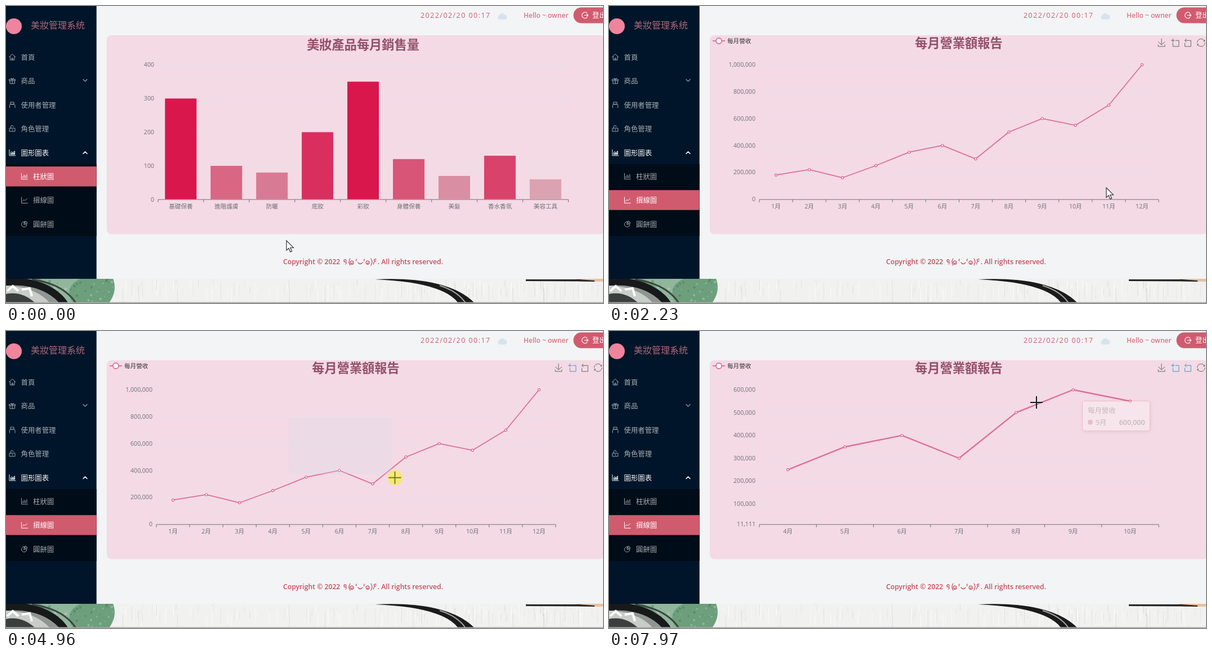
An HTML page that plays this animation: 1060x528 px, repeating every 8 s.

```html
<!DOCTYPE html>
<html lang="zh-Hant">
<head>
<meta charset="utf-8">
<style>
html, body { margin: 0; width: 100%; height: 100%; overflow: hidden; background: #f2f4f5; }
svg { display: block; width: 1060px; height: 528px; }
text { font: 12.4px 'Open Sans', 'Noto Sans CJK TC', 'Noto Sans CJK', sans-serif; white-space: pre; }
.axis text { font-size: 10.6px; fill: #6e7079; }
.title { font-size: 22.2px; font-weight: 700; fill: #925068; text-anchor: middle; }
.bold { font-weight: 600; }
.end { text-anchor: end; }
.mid { text-anchor: middle; }
.stroke { fill: none; stroke-linecap: round; stroke-linejoin: round; }
.tool path { fill: none; vector-effect: non-scaling-stroke; stroke-width: 1; }
</style>
</head>
<body>
<svg viewBox="0 0 1060 528">
  <defs>
    <clipPath id="strip"><rect y="485" width="1060" height="43"/></clipPath>
    <clipPath id="reveal"><rect id="revealBox" x="266" y="96" width="0" height="250"/></clipPath>
    <filter id="shadow" x="-20%" y="-30%" width="140%" height="170%">
      <feDropShadow dx="1" dy="2" stdDeviation="3" flood-opacity=".2"/>
    </filter>
  </defs>
  <rect width="1060" height="528" fill="#f2f4f5"/>

  <g clip-path="url(#strip)">
    <rect y="485" width="1060" height="43" fill="#f1f1f0"/>
    <g id="streaks"></g>
    <ellipse cx="98" cy="500" rx="95" ry="62" fill="#6d9f7d"/>
    <path d="M60 485h72q-30 14-14 43h-18q-6-28-40-43z" fill="#a9c6b0" opacity=".6"/>
    <g id="speckles"></g>
    <ellipse cx="14" cy="556" rx="98" ry="66" fill="#8f9691" stroke="#17191a" stroke-width="13"/>
    <path d="M0 497q52 2 78 31H0z" fill="#c9cdc9"/>
    <path d="M0 512q28-6 52 16H0z" fill="#3a3f3d"/>
    <path d="m2 507 10-9 10 9m6-3 14-2 4 14" fill="none" stroke="#fff" stroke-width="4"/>
    <path d="M46 486q56 8 78 42" fill="none" stroke="#3c4640" stroke-width="3"/>
    <path d="M655 486Q785 480 832 528H803Q776 491 655 486z" fill="#1b1b1c"/>
    <path d="M770 497q32 10 46 31" fill="none" stroke="#a5a5a5" stroke-width="2"/>
    <path d="M1012 485h48v5h-40z" fill="#eabf9f"/>
    <path d="M923 486h94l28 2v2q-60-1-122-1z" fill="#252525"/>
    <rect y="526.5" width="1060" height="1.5" fill="#aaa"/>
  </g>

  <rect width="160.700" height="485" fill="#001529"/>
  <rect y="281" width="160.700" height="128" fill="#000c17"/>
  <circle cx="14" cy="36" r="14" fill="#ee849d"/>
  <text x="44" y="39.5" style="font-size:16px" fill="#ad6878">美妝管理系统</text>
  <rect id="barBack" y="285.300" width="160.700" height="35.400" fill="#d15b6e"/>
  <rect id="lineBack" y="327.300" width="160.700" height="35.400" fill="#d15b6e"/>
  <g id="menu"></g>
  <path class="stroke" d="m137 130.500 3.500 3.500 3.500-3.500" stroke="#8a949e" stroke-width="1.4"/>
  <path class="stroke" d="m137 262.500 3.500-3.500 3.500 3.500" stroke="#fff" stroke-width="1.6"/>

  <text x="736" y="21" fill="#cf5b6d" letter-spacing="1.5">2022/02/20 00:17</text>
  <path d="M876 24a4 4 0 0 1 0-7.500a5 5 0 0 1 9-1a4.300 4.300 0 0 1 1 8.500z" fill="#d6e3ee"/>
  <text class="bold" x="919" y="21" style="font-size:12px" fill="#dc7385">Hello ~ owner</text>
  <rect x="1007.500" y="2.500" width="80" height="28" rx="14" fill="#d15b6e"/>
  <path class="stroke" d="M1031.500 12.500a5.300 5.300 0 1 0 0 8M1027 16.500h6.500m-2-2 2 2-2 2" stroke="#fff" stroke-width="1.2"/>
  <text x="1041" y="21" fill="#fff">登出</text>

  <rect x="179" y="52" width="884" height="353.500" rx="8" fill="#f4dae4"/>
  <g id="barChart">
    <text class="title" x="634" y="77">美妝產品每月銷售量</text>
  </g>
  <g id="lineChart">
    <text class="title" x="621" y="74">每月營業額報告</text>
    <path d="M184 62h22" stroke="#db7093" stroke-width="1.800"/>
    <circle cx="195" cy="62" r="5" fill="#fff" stroke="#db7093" stroke-width="1.800"/>
    <text x="210" y="65.500" style="font-size:10.6px" fill="#333">每月營收</text>
    <g class="tool" id="tools" stroke="#666"></g>
    <g id="fullAxis"></g>
    <g id="zoomAxis"></g>
    <g clip-path="url(#reveal)"><polyline id="curve" class="stroke" stroke="#db7093"/></g>
    <g id="dots" fill="#fff" stroke="#db7093" stroke-width="1.400"></g>
    <rect id="brush" x="502" y="154" fill="#d2dbee" opacity=".25"/>
    <g id="tip">
      <rect x="840.500" y="124.500" width="120" height="53" rx="4" fill="#fff" stroke="#db7093" filter="url(#shadow)"/>
      <g fill="#666">
        <text x="850" y="145.500">每月營收</text>
        <text x="864" y="166.500">9月</text>
        <text class="bold end" x="951.500" y="166.500">600,000</text>
      </g>
      <circle cx="854.500" cy="162" r="4.500" fill="#db7093"/>
    </g>
  </g>

  <g fill="#c84c5e">
    <text class="bold" x="492" y="459" style="font-size:12.2px">Copyright © 2022</text>
    <g class="stroke" stroke="#c84c5e" stroke-width="1.300">
      <path d="M604 453a2 2 0 1 0-2 2h2q0 4-1 4M611 449q-4 6 0 12M648 449q4 6 0 12M657 450q-4 0-3.500 2.500q1 1.500 3.500.5q-4 1.500-4.500 6"/>
      <path d="M615 456a1.500 1.500 0 1 0 2 1a3 3 0 1 0-2 2M643 456a1.500 1.500 0 1 0 2 1a3 3 0 1 0-2 2M622.500 450q-2 1-.5 3M636.500 450q-2 1-.5 3M625 456q4 5 8 0"/>
    </g>
    <text class="bold end" x="776" y="459" style="font-size:12.2px">. All rights reserved.</text>
  </g>

  <circle id="press" r="13.500" fill="#f7e86a" opacity=".92"/>
  <g id="pointer">
    <path id="arrow" d="M0 0V17.500l4-3.800 2.900 6.500 2.700-1.200-2.800-6.300h5.700z" fill="#fff" stroke="#222" stroke-width="1.100"/>
    <path id="hand" d="M-2 1q2-2 4 0V9q3-1 4 1 3-1 4 2 1 5-1 8l-1 3H-2Q-4 18-7 14q-1-3 2-2l3 3z" fill="#fff" stroke="#222" stroke-width="1.100"/>
    <path id="cross" d="M-11 0H11M0-11V11" stroke-width="2"/>
  </g>
</svg>
<script>
const $ = id => document.getElementById(id);
const add = (parent, tag, attrs, text) => {
  const el = document.createElementNS('http://www.w3.org/2000/svg', tag);
  for (const key in attrs) el.setAttribute(key, attrs[key]);
  if (text) el.textContent = text;
  return parent.appendChild(el);
};
const set = (el, attrs) => { for (const key in attrs) el.setAttribute(key, attrs[key]); };
const show = (el, on) => { el.style.display = on ? '' : 'none'; };
const span = (t, from, to) => Math.min(1, Math.max(0, (t - from) / (to - from)));
const mix = (a, b, u) => a + (b - a) * u;
const cubicInOut = u => u < .5 ? 4 * u ** 3 : 1 - 4 * (1 - u) ** 3;
const cubicOut = u => 1 - (1 - u) ** 3;

const CLICK = 800, REVEAL = 835, PRESS = 4640, RELEASE = 5370, ZOOMED = 5870;
const LEFT = 267, RIGHT = 976, TOP = 104.5, BOTTOM = 343.5;

// Sidebar
const icons = {
  home: 'M0 6 6 .5 12 6M2 5v6.5h8V5M5 11.5V8h2v3.5',
  gift: 'M.5 3.500h11V6h-11zM1.500 6v5.500h9V6M6 3.500v8M6 3.500C2 3 3-.5 6 3.500 9-.5 10 3 6 3.500',
  user: 'M3 1h6v4H3zM1 11.500V7q0-2 2-2h6q2 0 2 2v4.500',
  lock: 'M1 5.500h10v6H1zM3 5.500V3a2.500 2.500 0 0 1 5 0M6 7.500v2',
  area: 'M.5.5v11H12M3 9V6l2-2 2 2 3.500-3v6zM4 8h6M5 6.500h5',
  bars: 'M.5.5v11H12M3 9V6M5.500 9V3.500M8 9V5M10.500 9V2.500',
  line: 'M.5.5v11H12M2.500 8 5 5l2 2 4-4',
  pie: 'M5.500 1.500a5 5 0 1 0 5 5h-5zM7.500.5a4.500 4.500 0 0 1 4 4h-4z'
};
const menuRows = [
  ['home', '首頁', 91], ['gift', '商品', 133], ['user', '使用者管理', 176], ['lock', '角色管理', 218],
  ['area', '圖形圖表', 261, 1], ['bars', '柱狀圖', 303], ['line', '摺線圖', 345.5], ['pie', '圓餅圖', 388]
].map(([icon, label, y, opacity = .65], i) => {
  const x = i > 4 ? 27 : 5.5;
  const row = add($('menu'), 'g', { opacity });
  add(row, 'path', { class: 'stroke', d: icons[icon], stroke: '#fff', transform: `translate(${x} ${y - 6}) scale(.95)` });
  add(row, 'text', { x: x + 21, y: y + 4.5, fill: '#fff' }, label);
  return row;
});

// Texture of the backdrop: vertical streaks and paint speckles
let seed = 7;
const random = () => (seed = seed * 16807 % 2147483647) / 2147483647;
for (let i = 0; i < 260; i++) {
  const x = 195 + random() * 860, y = 485 + random() * 20;
  add($('streaks'), 'path', { d: `M${x} ${y}v${8 + random() * 25}`, stroke: i % 2 ? '#fff' : '#999', opacity: random() * (i % 2 ? .8 : .22) });
}
for (let i = 0; i < 160; i++) {
  const angle = random() * 6.28, reach = Math.sqrt(random());
  add($('speckles'), 'circle', {
    cx: 98 + Math.cos(angle) * reach * 92, cy: 500 + Math.sin(angle) * reach * 58,
    r: .6 + random() * 2, fill: i % 2 ? '#3f6b50' : '#c4dac9', opacity: .4
  });
}

// Axes
function drawAxis(parent, box, values, names, yOf, gridOpacity) {
  const { left, right, bottom, labelX } = box;
  const axis = add(parent, 'g', { class: 'axis' });
  for (const value of values) {
    const y = yOf(value);
    if (y < bottom - 1) add(axis, 'path', { d: `M${left} ${y}H${right}`, stroke: '#e0e6f1', opacity: gridOpacity });
    add(axis, 'text', { class: 'end', x: labelX, y: y + 3.6 }, value.toLocaleString('en-US'));
  }
  const band = (right - left) / names.length;
  let d = `M${left} ${bottom}H${right}`;
  names.forEach((name, i) => {
    d += `M${left + band * i} ${bottom}v5`;
    add(axis, 'text', { class: 'mid', x: left + band * (i + .5), y: bottom + 15.5 }, name);
  });
  add(axis, 'path', { d: d + `M${right} ${bottom}v5`, stroke: '#6e7079', fill: 'none' });
}

const barY = v => 344 - v * .5985;
const categories = ['基礎保養', '進階護膚', '防曬', '底妝', '彩妝', '身體保養', '美髮', '香水香氛', '美容工具'];
drawAxis($('barChart'), { left: 270, right: 998.5, bottom: 344, labelX: 263 },
  [0, 100, 200, 300, 400], categories, barY, .8);
[[300, '#d9174d'], [100, '#d96683'], [80, '#d97a95'], [200, '#d92f5f'], [350, '#d9174d'],
 [120, '#d95577'], [70, '#d98ea4'], [130, '#d9426a'], [60, '#dba2b1']].forEach(([v, fill], i) =>
  add($('barChart'), 'rect', { x: 282.3 + 80.95 * i, y: barY(v), width: 56, height: 343.5 - barY(v), fill }));

const sales = [180, 220, 160, 250, 350, 400, 300, 500, 600, 550, 700, 1000].map(v => v * 1000);
const months = sales.map((_, i) => `${i + 1}月`);
const yIn = (v, low, high) => BOTTOM - (v - low) / (high - low) * (BOTTOM - TOP);
const lineBox = { left: LEFT, right: RIGHT, bottom: BOTTOM + .5, labelX: 260 };
const LOW = 11111, HIGH = 600000;
drawAxis($('fullAxis'), lineBox, [0, 2, 4, 6, 8, 10].map(v => v * 1e5), months, v => yIn(v, 0, 1e6), .5);
drawAxis($('zoomAxis'), lineBox, [LOW, 1e5, 2e5, 3e5, 4e5, 5e5, HIGH], months.slice(3, 10), v => yIn(v, LOW, HIGH), .5);
const dots = sales.map(() => add($('dots'), 'circle', {}));

const tools = [
  [974, 'M4.7 22.9 29.3 45.5 54.7 23.4M4.6 43.6V58H53.8V43.6M29.2 45.1V0'],
  [998, 'M0 13.5H26.9M13.5 26.9V0M32.1 13.5H58V58H13.5V32.1'],
  [1020, 'M22 1.4 9.9 13.5 22.2 25.8M10.3 13.5H54.9V58.1H10.3V32.1'],
  [1044, 'M47 18.9h9.8V8.700M56.3 20.1C52.1 9 40.5.6 26.8 2.1 12.6 3.700 1.600 16.2 2.100 30.6M13 41.1H3.100V51.3M3.700 39.9c4.200 11.1 15.8 19.5 29.5 18 14.2-1.600 25.2-14.1 24.7-28.5']
].map(([x, d]) => add($('tools'), 'path', { d, transform: `translate(${x} 58) scale(.24)` }));

// Pointer path: time, x, y
const path = [
  [0, 498, 417], [60, 498, 417], [250, 420, 408], [500, 200, 365], [680, 95, 344], [780, 82, 342], [1400, 82, 342],
  [1550, 125, 343], [1720, 222, 343], [1950, 560, 340], [2100, 790, 330], [2220, 883, 323], [2420, 883, 323],
  [2750, 960, 250], [3000, 1026, 150], [3230, 1013, 100], [3510, 1007, 74], [3620, 1005, 64], [3740, 1005, 64],
  [3880, 955, 115], [4020, 893, 172], [4120, 893, 172], [4350, 680, 165], [4540, 502, 154], [PRESS, 502, 154],
  [4960, 690, 260.5], [5260, 835, 341], [5400, 835, 341], [5800, 856, 294], [6040, 856, 294],
  [6250, 920, 205], [6480, 1030, 100], [6830, 917, 147], [7260, 826, 112], [7700, 826, 112], [7970, 759, 127], [8000, 759, 127]
];
function pointerAt(t) {
  const i = Math.max(1, path.findIndex(p => p[0] >= t));
  const [a, b] = [path[i - 1], path[i]], u = span(t, a[0], b[0]);
  return [mix(a[1], b[1], u), mix(a[2], b[2], u)];
}

function drawCurve(t) {
  const zoom = cubicInOut(span(t, RELEASE, ZOOMED));
  const low = mix(0, LOW, zoom), high = mix(1e6, HIGH, zoom);
  const first = mix(0, 3, zoom), band = (RIGHT - LEFT) / mix(12, 7, zoom);
  const points = sales.map((v, i) => [LEFT + (i + .5 - first) * band, yIn(v, low, high)]);
  const kept = zoom === 1 ? points.slice(3, 10) : points;
  const hoverLine = t > 4120 && t < 4300 || t >= 7430;
  set($('curve'), { points: kept.join(' '), 'stroke-width': hoverLine ? 2.4 : 1.8 });
  set($('revealBox'), { width: span(t, REVEAL, REVEAL + 1000) * (RIGHT - LEFT + 2) });
  dots.forEach((dot, i) => {
    const start = REVEAL + 40 + 1000 * (i + .5) / 12;
    const grow = cubicOut(span(t, start, start + 300));
    const hovered = i === 8 && t >= 7430 && t < 7760;
    show(dot, grow > 0 && (t < RELEASE || i > 2 && i < 10));
    set(dot, { cx: points[i][0], cy: points[i][1], r: 2 * grow * (hovered ? 1.4 : 1) });
  });
  set($('fullAxis'), { opacity: t < RELEASE ? 1 : 0 });
  set($('zoomAxis'), { opacity: zoom });
}

function render(t) {
  const [x, y] = pointerAt(t);
  const swap = cubicInOut(span(t, CLICK, CLICK + 300));
  set($('barBack'), { opacity: 1 - swap });
  set($('lineBack'), { opacity: swap });
  set(menuRows[5], { opacity: mix(1, .65, swap) });
  set(menuRows[6], { opacity: t > 680 ? 1 : .65 });
  show($('barChart'), t < 845);
  show($('lineChart'), t >= 845);
  drawCurve(t);

  set(tools[1], { stroke: t > 3580 ? '#3e98c5' : '#666' });
  set(tools[2], { stroke: t >= RELEASE ? '#3e98c5' : '#666' });
  const dragging = t >= PRESS && t < RELEASE;
  show($('brush'), dragging);
  set($('brush'), { width: Math.max(0, x - 508), height: Math.max(0, y - 160.5) });
  set($('tip'), { opacity: span(t, 7430, 7630) * (1 - .7 * span(t, 7850, 7970)) });

  show($('press'), dragging);
  set($('press'), { cx: x, cy: y });
  set($('pointer'), { transform: `translate(${x} ${y})` });
  const crossed = t >= 3800;
  const overLink = !crossed && (x < 161 || t > 3580);
  show($('arrow'), !crossed && !overLink);
  show($('hand'), overLink);
  show($('cross'), crossed);
  set($('cross'), { stroke: dragging ? '#6f7d1c' : '#0b1f1a' });
}

const origin = performance.now();
function tick() {
  render((performance.now() - origin) % 8000);
  requestAnimationFrame(tick);
}
tick();
</script>
</body>
</html>
```
